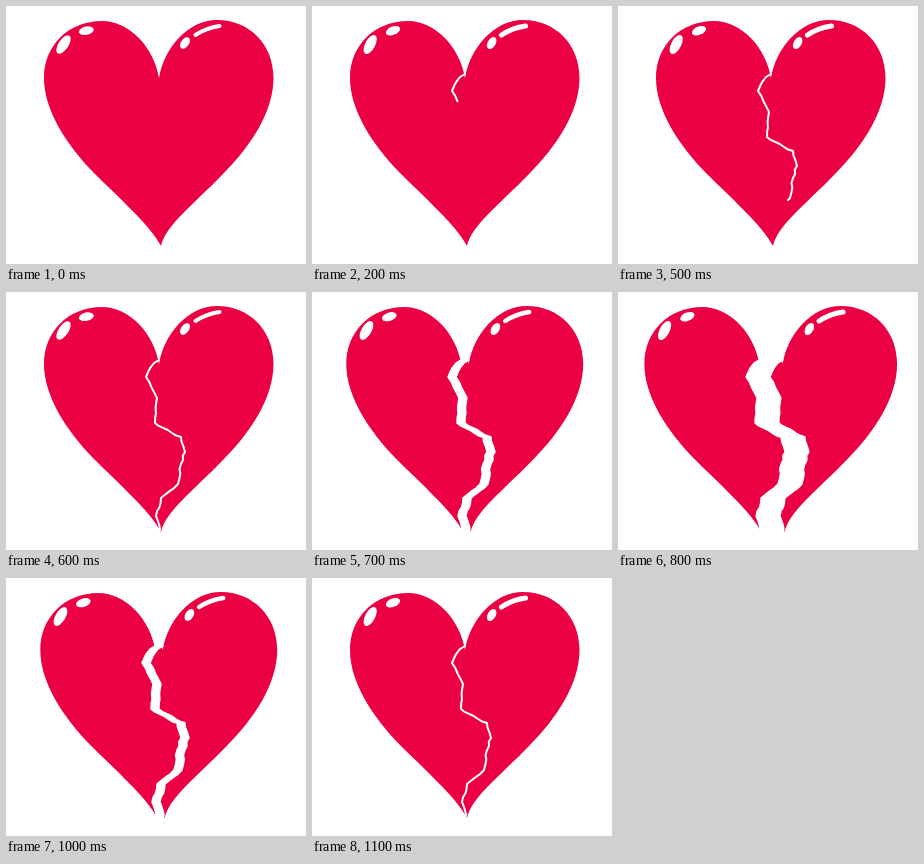
Recreate the animation shown at these times as an HTML page with a canvas. Size 300 by 258 pixels, loop 1.2 s.

```html
<!DOCTYPE html>
<html lang="en">
<head>
<meta charset="utf-8">
<title>Breaking heart</title>
<style>
  html, body { margin: 0; width: 100%; height: 100%; overflow: hidden; background: #fff; }
  canvas { display: block; width: 300px; height: 258px; }
</style>
</head>
<body>
<canvas id="stage" width="300" height="258"></canvas>
<script>
const ctx = document.getElementById('stage').getContext('2d');
const STEP = 100, STEPS = 12;
const RED = '#ea0043';

const heart = new Path2D(
  'M153 72C148 42 124 15 96 15C62 15 38 40 38 72C38 104 60 138 88 167' +
  'C112 191 144 219 155 240C159 220 188 198 217 168C244 141 267.5 106 267.5 72' +
  'C267.5 38 243 14 211 14C182 14 158 42 153 72Z');

function seeded(seed) {
  return () => (seed = seed * 16807 % 2147483647) / 2147483647;
}

// Breaks every segment into short pieces and nudges the new points
function roughen(points, piece, amount) {
  const random = seeded(11);
  const nudge = () => (random() * 2 - 1) * amount;
  const rough = [points[0]];
  points.slice(1).forEach(([x, y], i) => {
    const [px, py] = points[i];
    const count = Math.ceil(Math.hypot(x - px, y - py) / piece);
    for (let k = 1; k < count; k++) {
      const t = k / count;
      rough.push([px + (x - px) * t + nudge(), py + (y - py) * t + nudge()]);
    }
    rough.push([x, y]);
  });
  return rough;
}

const crackPoints = roughen([
  [153, 68], [148, 71], [140, 85], [151, 106], [149, 131], [166, 141], [175, 145],
  [179, 160], [175, 172], [172, 192], [155, 206], [150, 224], [154, 238]
], 6, 0.9);
const crackLength = crackPoints.slice(1).reduce((sum, [x, y], i) =>
  sum + Math.hypot(x - crackPoints[i][0], y - crackPoints[i][1]), 0);

const line = 'L' + crackPoints.join('L');
const crack = new Path2D('M' + crackPoints[0] + line);
const sideOf = edge => new Path2D(`M153 0${line}L154 258L${edge} 258L${edge} 0Z`);
const leftSide = sideOf(-20), rightSide = sideOf(320);

function ellipse(x, y, rx, ry, degrees) {
  ctx.beginPath();
  ctx.ellipse(x, y, rx, ry, degrees * Math.PI / 180, 0, Math.PI * 2);
  ctx.fill();
}

// The shine is redrawn in three slightly different poses
function drawShine(pose) {
  const shift = 0.8 * Math.sin(pose * Math.PI / 3);
  ctx.fillStyle = '#fff';
  ellipse(57.5 + shift, 38.5, 5, 10.5, 34 - 3 * pose);
  ellipse(80.3 + shift, 24.7, 7.5, 4.2, -12 - 5 * pose);
  ellipse(179 + shift, 37, 4, 6.5, 36 - 3 * pose);
  ctx.lineWidth = 4 + pose / 2;
  ctx.stroke(new Path2D('M189.5 29Q200 22 213.5 20'));
}

function drawCrack(length) {
  if (!length) return;
  ctx.lineWidth = 2;
  ctx.setLineDash([length, crackLength + 9]);
  ctx.stroke(crack);
  ctx.setLineDash([]);
}

function drawHeart(pose, length, dx = 0, side = null) {
  ctx.save();
  ctx.translate(dx, 0);
  ctx.save();
  if (side) ctx.clip(side);
  ctx.fillStyle = RED;
  ctx.fill(heart);
  drawShine(pose);
  ctx.restore();
  drawCrack(length);
  ctx.restore();
}

function draw(step) {
  const pose = step % 3;
  const length = (crackLength + 1) * Math.min(1, step / 6) ** 1.65;
  // The halves part and meet again around the middle of step 8 and 9
  const gap = 3.7 * Math.max(0, 2.5 - Math.abs(step - 8.5)) ** 1.65;

  ctx.fillStyle = '#fff';
  ctx.fillRect(0, 0, 300, 258);
  ctx.strokeStyle = '#fff';
  ctx.lineCap = ctx.lineJoin = 'round';
  if (gap) {
    drawHeart(pose, length, -gap, leftSide);
    drawHeart(pose, length, gap, rightSide);
  } else {
    drawHeart(pose, length);
  }
}

const start = performance.now();
function tick() {
  const elapsed = Math.max(0, performance.now() - start);
  draw(Math.floor(elapsed / STEP) % STEPS);
  requestAnimationFrame(tick);
}
tick();
</script>
</body>
</html>
```
